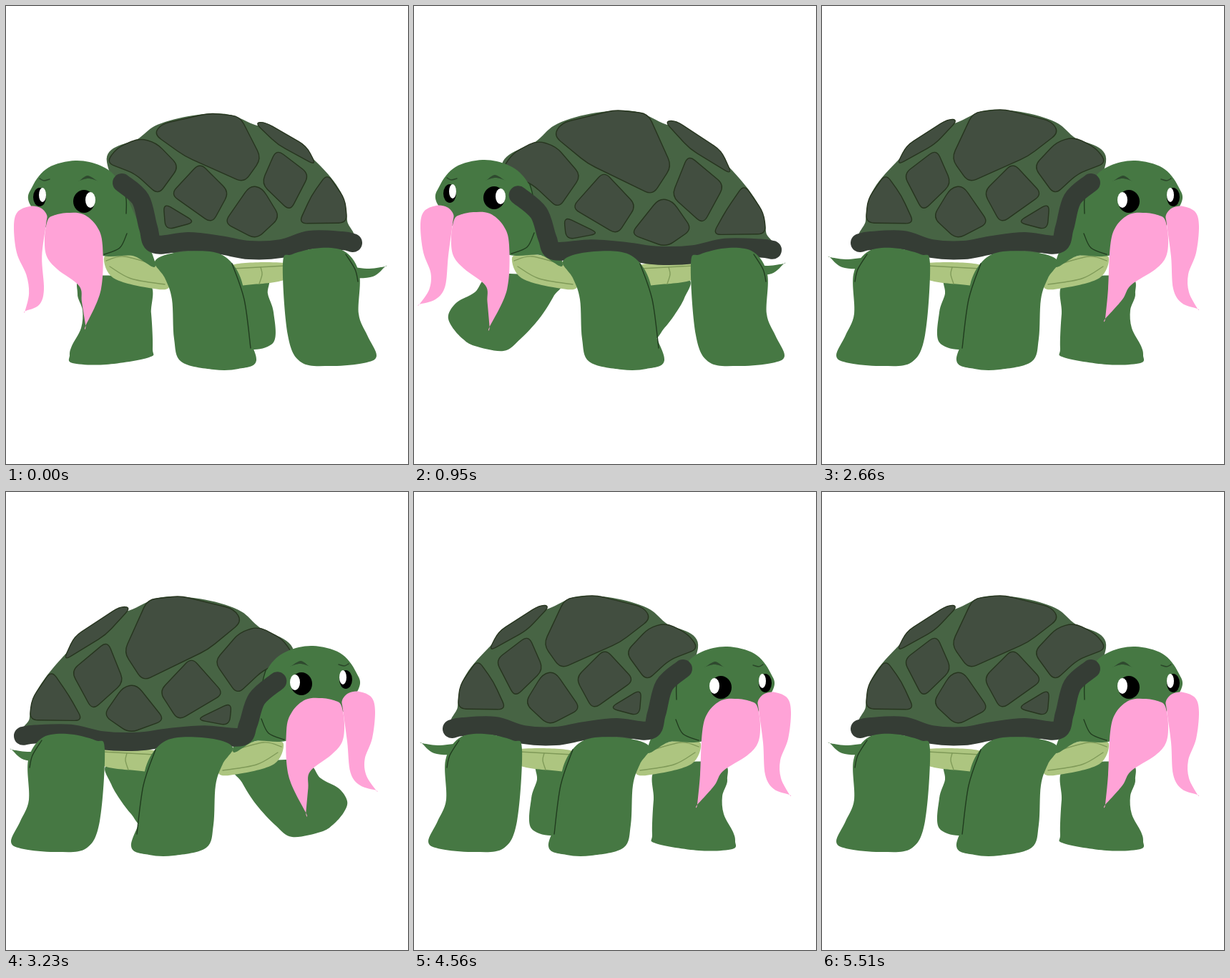
These frames come from a looping animation (562x640 px, 5.7 s). An HTML page with a canvas:

```html
<!DOCTYPE html>
<html>
<head>
<meta charset="utf-8">
<style>
html, body { margin: 0; width: 100%; height: 100%; overflow: hidden; background: #fff; }
canvas { display: block; }
</style>
</head>
<body>
<canvas id="stage" width="562" height="640"></canvas>
<script>
const ctx = document.getElementById('stage').getContext('2d');
const GREEN = '#467843', LINE = '#213c1f', PINK = '#ffa3d7', BELLY = '#adc580', OLIVE = '#7f9a58';

// Amounts from 0 to 1: near legs lifted, far legs lifted, upright variant of the stand
let near, far, tall;

function points(text) {
  const v = text.split(' ').map(Number);
  return v.filter((_, i) => i % 2 === 0).map((x, i) => [x, v[2 * i + 1]]);
}

const move = (text, dx, dy) => points(text).map(([x, y]) => [x + dx, y + dy]);

function mix(from, to, t) {
  const end = points(to);
  return points(from).map(([x, y], i) => [x + (end[i][0] - x) * t, y + (end[i][1] - y) * t]);
}

// Smooth curve through all points; a doubled point makes a corner.
function trace(p, closed) {
  const n = p.length;
  const at = i => p[closed ? (i + n) % n : Math.max(0, Math.min(n - 1, i))];
  ctx.beginPath();
  ctx.moveTo(...p[0]);
  for (let i = 0; i < (closed ? n : n - 1); i++) {
    const [a, b, c, d] = [at(i - 1), at(i), at(i + 1), at(i + 2)];
    ctx.bezierCurveTo(b[0] + (c[0] - a[0]) / 6, b[1] + (c[1] - a[1]) / 6,
      c[0] - (d[0] - b[0]) / 6, c[1] - (d[1] - b[1]) / 6, ...c);
  }
}

function blob(color, p) {
  trace(p, true);
  ctx.fillStyle = color;
  ctx.fill();
}

function line(color, p, width = 1.4) {
  trace(p, false);
  ctx.strokeStyle = color;
  ctx.lineWidth = width;
  ctx.stroke();
}

function oval(color, x, y, rx, ry) {
  ctx.beginPath();
  ctx.ellipse(x, y, rx, ry, 0, 0, 2 * Math.PI);
  ctx.fillStyle = color;
  ctx.fill();
}

// The shell leans and swells with the step.
const warp = text => points(text).map(([x, y]) => [
  x + far * 0.1 * (x - 325) + near * (0.09 * (y - 230) - 15),
  y + far * 19 * Math.exp(-(((y - 270) / 75) ** 2)) - near * 0.115 * (y - 160) + tall * 0.1 * Math.max(0, 200 - y)
]);

function plate(text) {
  const p = warp(text), n = p.length;
  const toward = ([x, y], [u, v]) => {
    const d = Math.hypot(u - x, v - y), k = Math.min(12, d / 2) / d;
    return [x + (u - x) * k, y + (v - y) * k];
  };
  ctx.beginPath();
  p.forEach((q, i) => {
    ctx.lineTo(...toward(q, p[(i + n - 1) % n]));
    ctx.quadraticCurveTo(...q, ...toward(q, p[(i + 1) % n]));
  });
  ctx.closePath();
  ctx.fillStyle = '#424e40';
  ctx.strokeStyle = '#27351f';
  ctx.lineWidth = 1.4;
  ctx.fill();
  ctx.stroke();
}

function farSide() {
  blob(GREEN, move('470 352 505 354 527 351 527 351 510 365 480 366',
    3 * tall - 10 * far - 20 * near, 13 * tall + 9 * far - 28 * near));
  const back = near
    ? mix('330 380 366 380 366 402 374 428 374 470 338 478 328 440',
      '290 420 345 420 370 445 368 465 338 482 268 481 266 460', near)
    : mix('330 380 366 380 366 402 374 428 374 470 338 478 328 440',
      '330 380 384 382 378 408 364 432 350 450 335 464 328 410', far);
  blob(GREEN, back);
  blob(GREEN, mix('110 378 100 402 107 425 105 450 92 475 89 488 93 499 140 501 200 491 205 478 203 430 197 385',
    '112 375 85 400 60 414 48 432 53 448 68 465 85 475 125 482 148 466 175 437 195 406 205 382', far));
}

function belly() {
  blob(BELLY, points('137 352 155 347 180 349 215 362 228 393 200 394 150 380'));
  line(OLIVE, points('140 356 165 350 210 362'));
  line(OLIVE, points('145 364 175 381 222 389'));
  const rear = [-4 * near, -14 * near];
  blob(BELLY, move('315 362 395 360 390 382 345 389 318 388', ...rear));
  line(OLIVE, move('317 367 390 363', ...rear));
  line(OLIVE, move('356 365 358 375 354 388', ...rear));
}

function shell() {
  blob('#476444', warp('141 218 186 183 212 162 260 148 310 146 350 163 376 167 434 218 468 260 477 300 475 330 330 345 210 335'));
  plate('140 219 155 198 186 183 210 190 242 224 213 264 180 234');
  plate('207 177 217 161 285 144 327 149 357 213 333 247 250 210');
  plate('348 159 362 158 420 195 434 223 380 193');
  plate('378 200 424 235 397 287 357 248');
  plate('449 234 474 270 477 303 409 304 427 265');
  plate('271 219 312 260 288 304 230 263');
  plate('341 251 358 254 383 295 350 326 305 303');
  plate('220 275 265 302 223 313');
}

function rim() {
  line('#353d35', warp('162 247 188 270 199 310 209 333 255 329 300 334 340 341 385 339 425 327 470 328 485 331'), 26);
}

function nearLegs() {
  blob(GREEN, mix('387 360 400 347 440 338 475 344 494 375 493 430 505 460 518 489 500 499 455 503 413 498 394 460',
    '374 336 395 318 430 311 460 322 500 355 535 375 555 392 545 418 515 434 470 440 435 430 400 385', near));
  blob(GREEN, mix('208 357 235 345 285 343 313 356 331 390 333 445 350 495 325 507 290 508 245 497 235 465 232 410 222 380',
    '193 345 215 328 265 321 300 340 330 360 365 380 391 402 370 441 345 459 315 465 280 455 245 425 220 390', near));
  line(LINE, mix('475 347 488 368 492 385', '463 427 490 398 537 393', near));
  line(LINE, mix('316 360 333 410 342 478', '313 442 345 405 377 403', near));
}

const headShift = () => [-3 * tall - 4 * far - 3 * near, near - far];

function head() {
  const shift = headShift();
  blob(GREEN, move('37 278 40 252 62 226 100 216 135 223 160 243 180 285 212 362 180 349 138 349 80 330', ...shift));
  line(LINE, move('140 347 162 338 172 318', ...shift));
  line(LINE, move('166 250 171 270 171 290', ...shift));
}

function face() {
  const shift = headShift();
  line('#2b472a', move('50 241 56 244 64 242', ...shift));
  blob('#2f4a2f', move('106 244 106 244 117 237 130 244 130 244 118 241', ...shift));

  const ex = 3 * far - 2 * near, ey = -5 * far - near;
  oval('#000', 47 + ex, 267 + ey, 9, 13);
  oval('#fff', 51 + ex, 264 + ey, 5, 10);
  oval('#000', 109 + ex, 273 + ey, 15, 16);
  oval('#fff', 118 + ex, 271 + ey, 7, 11);
}

// Only the hanging end of each half swings.
function beard(text, top, dx, dy) {
  blob(PINK, points(text).map(([x, y]) => {
    const k = (Math.max(0, y - top) / (430 - top)) ** 2;
    return [x - 2 * far - 2 * near + dx * k, y - far + dy * k];
  }));
}

function moustache() {
  beard('56 305 57 292 48 282 33 280 16 288 11 308 15 345 26 375 25 400 13 423 13 423 35 415 47 395 50 350',
    340, 16 * tall - 4 * far + 8 * near, 4 * tall - 6 * far + 9 * near);
  beard('58 300 66 293 85 289 108 291 127 308 135 335 138 395 142 437 142 437 118 410 106 390 72 368 57 350 54 325',
    365, -25 * tall - 28 * far - 14 * near, 8 * tall + 10 * far);
}

const poses = { a: [0, 0, 1], b: [0, 0, 0], c: [0, 1, 0], d: [1, 0, 0] };
// One entry per slot: two letters stand for halfway between poses, "-" faces right.
const order = ('a ad d b bc c a ad d b bc c a a ' +
  '-b -b -bc -c -b -bd -d -b -bc -c -b -bd -d -b a -b').split(' ');

function draw(time) {
  const step = order[Math.floor(time / 190) % order.length];
  const keys = step.replace('-', '');
  const p = poses[keys[0]], q = poses[keys[1] || keys[0]];
  [near, far, tall] = p.map((v, i) => (v + q[i]) / 2);

  ctx.setTransform(1, 0, 0, 1, 0, 0);
  ctx.clearRect(0, 0, 562, 640);
  if (step[0] === '-') ctx.setTransform(-1, 0, 0, 1, 538 - 13 * far + 27 * near, 0);
  farSide();
  belly();
  shell();
  head();
  rim();
  nearLegs();
  face();
  moustache();
}

ctx.lineCap = ctx.lineJoin = 'round';
const start = performance.now();
function tick() {
  draw(performance.now() - start);
  requestAnimationFrame(tick);
}
tick();
</script>
</body>
</html>
```
